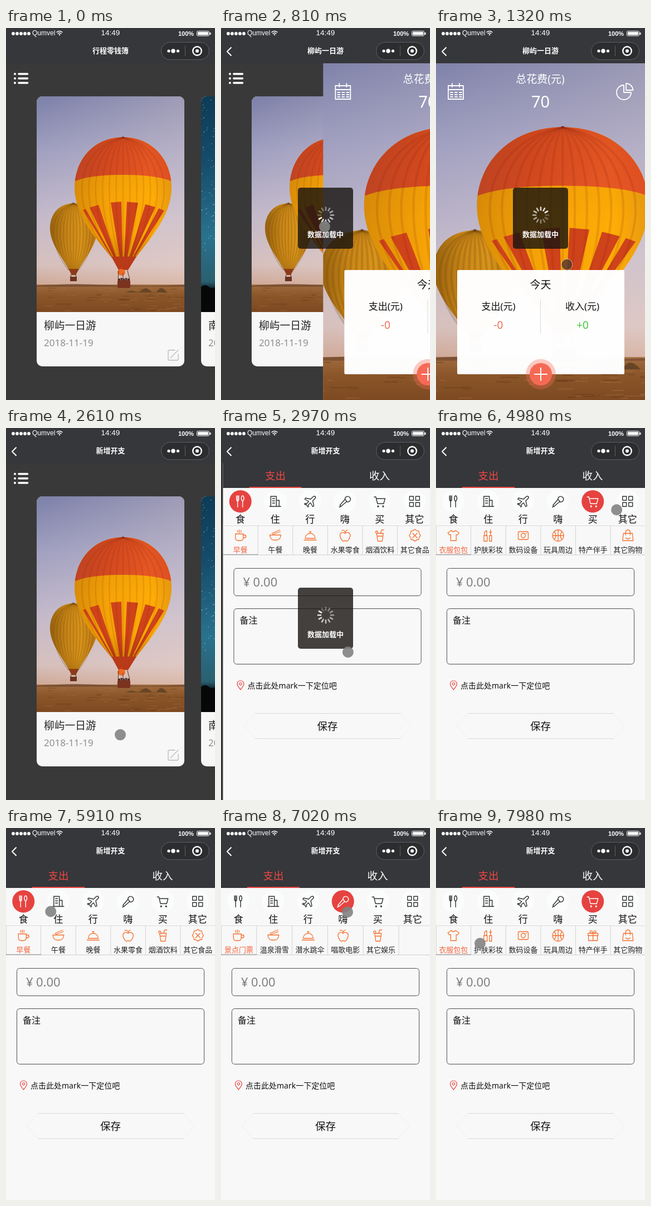
Animation of 375x664 px, one loop 8000 ms. Source, as an HTML page:

```html
<!DOCTYPE html>
<html lang="zh-CN">
<head>
<meta charset="utf-8">
<title>行程零钱簿</title>
<style>
html, body { margin: 0; width: 100%; height: 100%; overflow: hidden; background: #393939; }
svg { display: block; }
#stage { width: 375px; height: 664px; }
text { font-family: "Noto Sans", "Noto Sans CJK SC", "Noto Sans CJK", sans-serif; }
.arial { font-family: "Liberation Sans", Arial, sans-serif; }
.bold { font-weight: 700; }
.line { fill: none; stroke-linecap: round; stroke-linejoin: round; }
</style>
</head>
<body>
<svg id="stage" viewBox="0 0 375 664"></svg>
<script>
const LOOP = 8000;
const BAR = '#35373a', RED = '#e64340', ORANGE = '#f5702f';

const rect = (x, y, w, h, fill, more = '') => `<rect x="${x}" y="${y}" width="${w}" height="${h}" fill="${fill}" ${more}/>`;
const circle = (x, y, r, fill, more = '') => `<circle cx="${x}" cy="${y}" r="${r}" fill="${fill}" ${more}/>`;
const line = (d, color, width = 1, more = '') => `<path class="line" d="${d}" stroke="${color}" stroke-width="${width}" ${more}/>`;
const group = (id, body, more = '') => `<g id="${id}" ${more}>${body}</g>`;
// y is the middle of the glyphs
const text = (x, y, size, str, fill, anchor = 'middle', more = '') =>
  `<text x="${x}" y="${y + size * .37}" font-size="${size}" fill="${fill}" text-anchor="${anchor}" ${more}>${str}</text>`;
const gradient = (id, stops, more = 'x2="0" y2="1"') => `<linearGradient id="${id}" ${more}>${
  stops.map(([at, color]) => `<stop offset="${at}" stop-color="${color}"/>`).join('')}</linearGradient>`;
const range = n => [...Array(n).keys()];

let seed = 7;
const random = () => (seed = seed * 16807 % 2147483647) / 2147483647;

/* ---------- balloon photo ---------- */
const gores = (cx, top, low, half, color, opacity) => range(13).map(i => {
  const k = (i - 6) / 6.5, h = low - top;
  return line(`M${cx} ${top}C${cx + half * k} ${top + h * .08} ${cx + half * 1.33 * k} ${top + h * .54} ${cx + half * .25 * k} ${low}`,
    color, 2.4, `opacity="${opacity}"`);
}).join('');

const stripes = [[83, 88], [95, 111], [133, 152], [162, 182], [195, 213], [219, 229]].map(([a, b]) => {
  const top = x => 188 + ((x - 155) / 87) ** 2 * 22, low = x => 155 + (x - 155) * .28;
  return `M${a} ${top(a)}L${b} ${top(b)}L${low(b)} 287L${low(a)} 287z`;
}).join('');

const grass = range(70).map(() => {
  const x = random() * 265, y = 342 + random() * 42;
  return line(`M${x} ${y}h${4 + random() * 16}`, random() < .5 ? '#5f3515' : '#a9723c', 1.2, 'opacity=".4"');
}).join('');

const envelope = 'M155 73C100 73 68 116 68 163C68 214 110 258 135 288L178 288C200 258 242 214 242 163C242 116 210 73 155 73z';
const smallEnvelope = 'M66 191C39 191 24 211 24 236C24 264 48 290 58 309L75 309C86 290 109 264 109 236C109 211 93 191 66 191z';

const photo = `<symbol id="photo" viewBox="0 0 265 385" preserveAspectRatio="none">
  ${rect(0, 0, 265, 385, 'url(#sky)')}${rect(0, 0, 265, 337, 'url(#glow)')}
  ${rect(0, 336, 265, 49, 'url(#field)')}${grass}
  <path d="M0 338Q60 333 130 337T265 336V340H0z" fill="#7d5234"/>
  <path d="M160 350q8-5 16-2t14-3 14 2 14-1 16 4z" fill="#553a20" opacity=".7"/>
  <path d="${smallEnvelope}" fill="url(#gold)"/>
  ${gores(66, 191, 309, 42, '#6b3f06', .22)}
  <path d="M57 308h19l-6 11h-7z" fill="#8c3b19"/>
  ${line('M62 318l-1 4M70 318l1 4', '#4a2a18')}${rect(60, 322, 12, 8, '#6b3322')}
  <path d="${envelope}" fill="url(#yellow)"/>
  <clipPath id="hull"><path d="${envelope}"/></clipPath>
  <path d="M60 60H250V156Q225 140 155 140T60 156z" fill="url(#crown)" clip-path="url(#hull)"/>
  <path d="${stripes}" fill="#cf431a" clip-path="url(#hull)"/>
  ${gores(155, 73, 288, 87, '#7a1c08', .13)}
  <path d="${envelope}" fill="url(#shade)"/>
  <path d="M134 286h45l-15 24h-17z" fill="#b83a18"/>
  <ellipse cx="152" cy="314" rx="7" ry="6" fill="#ef6a25"/>
  ${line('M147 312l-1 15M163 311l4 16M155 316v10', '#5a3222')}
  ${rect(145, 328, 23, 14, '#7a3420', 'rx="2"')}
  ${range(5).map(i => circle(148 + i * 4.2, 327 - i % 2, 2, '#432a22')).join('')}
</symbol>`;

const defs = `<defs>
  ${gradient('sky', [[0, '#7c80a8'], [.25, '#a09fc0'], [.55, '#c3b9ca'], [.78, '#d6c0bd'], [.88, '#cfa794']])}
  ${gradient('glow', [[0, '#f4e4e000'], [1, '#f4e0d848']], '')}
  ${gradient('field', [[0, '#a06c3f'], [.4, '#8b5629'], [1, '#7d4922']])}
  ${gradient('yellow', [[0, '#d98c08'], [.35, '#f5a307'], [.8, '#feac06'], [1, '#e89a10']], '')}
  ${gradient('crown', [[0, '#bf4424'], [.35, '#d84b20'], [.75, '#ec5a25'], [1, '#e24e22']], '')}
  ${gradient('gold', [[0, '#95600f'], [.35, '#c98617'], [.65, '#d9941b'], [1, '#b57314']], '')}
  ${gradient('shade', [[0, '#5a1a0018'], [.5, '#5a1a0000'], [.8, '#5a1a0000'], [1, '#5a1a0030']])}
  ${gradient('night', [[0, '#0e3b55'], [.3, '#154c6b'], [.65, '#29728e'], [.86, '#2a5f70'], [.9, '#0a1519']])}
  <clipPath id="cardClip">${rect(55, 122, 265, 482, '#fff', 'rx="10"')}</clipPath>
  ${photo}
</defs>`;

/* ---------- pages ---------- */
const trip = '柳屿一日游';
const nightSky = rect(55, 122, 265, 385, 'url(#night)') +
  range(70).map(() => circle(56 + random() * 26, 124 + random() * 290, .3 + random() * .6, '#b8dbe5', 'opacity=".7"')).join('') +
  '<path d="M55 462q8-6 14 0t14-2V507H55z" fill="#050708"/>';

const card = (dx, image, name, date) => `<g transform="translate(${dx})"><g clip-path="url(#cardClip)">
  ${rect(55, 122, 265, 482, '#f7f7f7')}${image}
  ${text(68, 531, 18.75, name, '#222', 'start')}${text(68, 562, 17, date, '#8f8f8f', 'start')}
  ${line('M303 575H293q-2 0-2 2V591q0 2 2 2H307q2 0 2-2V582M295 589L309 575', '#bbb', 1.3)}</g></g>`;

const home = rect(0, 63, 375, 601, '#393939') +
  [82, 90, 98].map(y => circle(16, y, 2, '#fff') + line(`M23 ${y}H38.500`, '#fff', 3.6)).join('') +
  card(0, '<use href="#photo" x="55" y="122" width="265" height="385"/>', trip, '2018-11-19') +
  card(295, nightSky, '南', '2018');

const calendar = line('M22 103H49V127H22zM22 110H49M29 99v6M42 99v6', '#fff', 1.8) +
  line('M26 115H46M26 119H46M26 123H46', '#fff', 1.8, 'stroke-dasharray="4 4"');

const detail = `<svg x="0" y="63" width="375" height="601"><use href="#photo" x="-47" y="0" width="469" height="601"/></svg>` +
  calendar + line('M337 102A13 13 0 1 0 350 115H337zM341 99V111H353.500A12.500 12.500 0 0 0 341 99z', '#fff', 1.8) +
  text(187, 91, 19, '总花费(元)', '#fff') + text(187.5, 131, 29, '70', '#fff') +
  rect(38, 432, 300, 186, '#fff', 'rx="2" opacity=".985"') +
  text(187.5, 458, 19, '今天', '#111') + line('M187.500 485V545', '#d8d8d8') +
  text(112, 497, 17, '支出(元)', '#111') + text(262.5, 497, 17, '收入(元)', '#111') +
  text(112, 530, 19, '-0', '#f0705a') + text(263, 530, 19, '+0', '#49c93c') +
  circle(188, 618, 27, '#f66a55', 'opacity=".35"') + circle(188, 618, 20, '#f66a55') +
  line('M188 607v22M177 618h22', '#fff', 2);

const icons = {
  cutlery: 'M5 2v6q0 3 2 3.500V22M9 2v6q0 3-2 3.500M7 2v8M16 12C12 8 14 2 16 2s4 6 0 10V22',
  building: 'M4 21V3h10v18M14 10h5v11M2 21h20M7 7h4M7 11h4M7 15h4',
  plane: 'M21 3q-2-1-4 1l-4 4L4 6 2.500 8l7 4-3.500 4-3-.5L2 17l4 1.500L8 22l1.300-1-.5-3 4-3.500 4 7 2-1.500-2-9 4-4q2-2 .2-4z',
  mic: 'M12 8.500L3 19l2 2 10.500-9M16 13a5 5 0 1 0-4-5zM5 21l-3 1',
  cart: 'M2 4h3l3 12h11l2.500-9H6M9 20a1 1 0 1 0 .1 0M18 20a1 1 0 1 0 .1 0',
  grid: 'M3 3h7v7H3zM14 3h7v7h-7zM3 14h7v7H3zM14 14h7v7h-7z',
  cup: 'M3 9h14v7q0 5-5 5H8q-5 0-5-5zM17 11h2q3 0 3 2.500t-3 2.500h-2M7 6V3M10 7V2M13 6V3',
  bowl: 'M2 11h20q-1 9-8 9h-4q-7 0-8-9zM6 8L20 2M7 10L21 5',
  cloche: 'M3 17a9 9 0 0 1 18 0zM1 20h22M12 8V5M10.500 5h3',
  apple: 'M12 8C7 4 2 8 3 13s4 9 6 9 2-1 3-1 1 1 3 1 5-4 6-9-4-9-9-5zM12 8q0-4 4-6M12 5Q9 1 6 3',
  drink: 'M6 8h12l-2 14H8zM13 8l2-6h4M7 13h10M6 4a2 2 0 1 0 .1 0',
  plate: 'M12 1q3 3 7 3 0 4 3 8-3 3-3 7-4 0-7 3-3-3-7-3 0-4-3-7 3-4 3-8 4 0 7-3zM8 8l8 8M16 8l-8 8',
  shirt: 'M8 3L2 7l2.500 4L7 10v11h10V10l2.500 1L22 7l-6-4q-4 4-8 0z',
  lipstick: 'M4 12h6v10H4zM5 12V6l4-3v9M16 2v10M14 12h4v10h-4zM14 6h4',
  camera: 'M5 5h14q2 0 2 2v10q0 2-2 2H5q-2 0-2-2V7q0-2 2-2zM12 8a4 4 0 1 0 .1 0M17 8h1',
  ball: 'M12 2a10 10 0 1 0 .1 0M2 12h20M12 2v20M5 5q6 7 0 14M19 5q-6 7 0 14',
  gift: 'M3 8h18v4H3zM4 12h16v9H4zM12 8v13M12 8Q5 7 7 4t5 4Q15 1 17 4t-5 4',
  bag: 'M4 8h16l1.500 13H2.500zM8 11V6q0-4 4-4t4 4v5M8 16q4 4 8 0'
};
const icon = (name, x, y, color, width = 1.3, more = '') =>
  line(icons[name], color, width, `transform="translate(${x - 12} ${y - 12})" ${more}`);

const categories = [
  ['食', 'cutlery', '早餐 午餐 晚餐 水果零食 烟酒饮料 其它食品', 'cup bowl cloche apple drink plate'],
  ['住', 'building', '酒店 民宿 青旅 露营 租房 其它住宿', 'building cloche cup shirt gift plate'],
  ['行', 'plane', '飞机 火车 汽车 轮船 租车 其它交通', 'plane building cart cloche ball plate'],
  ['嗨', 'mic', '景点门票 温泉滑雪 潜水跳伞 唱歌电影 其它娱乐', 'camera bowl ball mic plate'],
  ['买', 'cart', '衣服包包 护肤彩妆 数码设备 玩具周边 特产伴手 其它购物', 'shirt lipstick camera ball gift bag'],
  ['其它', 'grid', '人情红包 通讯话费 医疗药品 其它花费', 'gift camera apple grid']
].map(([name, glyph, labels, glyphs]) => ({ name, glyph, labels: labels.split(' '), glyphs: glyphs.split(' ') }));
const cellWidth = labels => labels.length === 5 ? 63.8 : 62.6;

const categoryCell = ({ name, glyph }, i) => {
  const x = 31.25 + 62.5 * i;
  return circle(x, 131, 20, '#fbfcfc') + circle(x, 131, 20, RED, `id="spot${i}"`) +
    icon(glyph, x, 131, '#333', 1.4, `id="glyph${i}"`) + text(x, 163, 17, name, '#111');
};
const subRow = ({ labels, glyphs }, c) => {
  const w = cellWidth(labels), middle = i => (i + .5) * w;
  return group('labels' + c, labels.map((name, i) =>
      text(middle(i), 217, 13, name, i ? '#222' : '#f5623c') +
      line(`M${(i + 1) * w} 175V226`, '#d2d2d2')).join('') +
      line('M.5 175V226', '#d2d2d2') + line(`M0 226H${w}`, '#8a8a8a')) +
    group('icons' + c, glyphs.map((g, i) => icon(g, middle(i), 192, ORANGE, 1.3, g === 'gift' && c === 4 ? 'id="gift"' : '')).join(''));
};

const box = (y, h) => rect(19.5, y + .5, 336, h - 1, 'none', 'rx="5" stroke="#505050"');
const expense = rect(0, 63, 375, 601, '#f8f8f8') + rect(0, 63, 375, 44, BAR) +
  text(94, 85, 18.5, '支出', '#ef4744') + text(281, 85, 18.5, '收入', '#fff') + rect(47, 105, 94, 2, RED) +
  categories.map(categoryCell).join('') +
  line('M0 174.500H375', '#dcdcdc') + line('M0 226.500H375', '#cfcfcf') +
  categories.map(subRow).join('') +
  box(250, 50) + text(36, 275, 22, '¥', '#808080', 'start') + text(54, 275, 22, '0.00', '#808080', 'start') +
  box(322, 100) + text(30, 343, 16, '备注', '#111', 'start') +
  line('M31.500 467q-6-7-6-10.500a6 5.500 0 0 1 12 0q0 3.500-6 10.500zM31.500 454.500a2.200 2.200 0 1 0 .1 0', RED, 1.2) +
  text(44, 460, 14, '点击此处mark一下定位吧', '#111', 'start') +
  line('M58 509.500H318L338 532 318 554.500H58L38 532z', '#efefef') +
  line('M58 509.500H318M58 554.500H318', '#dadada') + text(187.5, 532, 18.5, '保存', '#111');

const header = rect(0, 0, 375, 63, BAR) +
  range(5).map(i => circle(13 + i * 7, 10, 2.9, '#fff')).join('') +
  text(47, 9, 12, 'Qumvel', '#fff', 'start', 'class="arial"') +
  line('M91 7.500q5-4 10 0M93 10q3-2.500 6 0', '#fff', 1.4) + circle(96, 12, 1.2, '#fff') +
  text(187.5, 8.5, 13.5, '14:49', '#fff', 'middle', 'class="arial"') +
  text(309, 9.5, 11, '100%', '#fff', 'start', 'class="arial bold"') +
  rect(342.5, 5.5, 22, 8.5, 'none', 'rx="2" stroke="#fff"') + rect(344, 7, 19, 5.5, '#fff', 'rx="1"') + rect(365.5, 8, 2, 4, '#fff') +
  text(187.5, 40.5, 13, '', '#fff', 'middle', 'id="title" class="bold"') +
  group('back', line('M18 35l-7 7 7 7', '#fff', 2)) +
  rect(278.5, 25.5, 86, 31, '#2c2d2f', 'rx="15.500" stroke="#5d5f62"') +
  circle(292, 41, 2.6, '#fff') + circle(300, 41, 3.7, '#fff') + circle(308.5, 41, 2.6, '#fff') +
  line('M321.500 32V50', '#5d5f62') + circle(343, 41, 7.8, 'none', 'stroke="#fff" stroke-width="2.400"') + circle(343, 41, 3, '#fff');

const toast = rect(138, 285, 99, 109, '#17130f', 'rx="5" opacity=".8"') +
  group('spinner', range(12).map(i =>
    line('M0 -9V-14', '#fff', 2.6, `transform="rotate(${i * 30})" opacity="${.25 + i * .06}"`)).join('')) +
  text(187.5, 368, 13, '数据加载中', '#fff', 'middle', 'class="bold"');

document.getElementById('stage').innerHTML = defs + group('home', home) + group('detail', detail) +
  group('expense', expense) + header + group('toast', toast) + circle(0, 0, 10, '#858585', 'id="cursor"');

/* ---------- motion ---------- */
const $ = id => document.getElementById(id);
const show = (id, on) => $(id).setAttribute('display', on ? 'inline' : 'none');
const within = (t, a, b) => t >= a && t < b;
const clamp = v => Math.min(1, Math.max(0, v));
const slideX = (t, a, b) => 375 * (1 - clamp((t - a) / (b - a))) ** 3;
const latest = (steps, t) => steps.filter(([at]) => at <= t).pop()[1];

const titles = [[0, '行程零钱簿'], [690, trip], [2580, '新增开支']];
const picks = [[0, 0], [3930, 1], [4290, 2], [4620, 3], [4860, 4], [5160, 5], [5760, 0], [7020, 3], [7530, 4]];
const trail = [
  [60, 339, 112], [240, 152, 308], [480, 152, 308], [1290, 235, 422], [1320, 235, 422], [2070, 189, 620],
  [2550, 189, 620], [2610, 205, 548], [3210, 243, 302], [3360, 243, 302], [3420, 235, 270], [3480, 209, 237],
  [3540, 165, 187], [3630, 127, 150], [3750, 99, 143], [3900, 99, 143], [4080, 150, 145], [4260, 150, 145],
  [4380, 165, 145], [4560, 165, 145], [4680, 218, 142], [4830, 275, 145], [4980, 324, 146], [5100, 341, 146],
  [5370, 341, 146], [5700, 45, 146], [5820, 45, 146], [6060, 138, 154], [6360, 138, 154], [6480, 172, 158],
  [6630, 171, 153], [6870, 217, 149], [7000, 217, 149], [7020, 227, 150], [7320, 227, 150], [7470, 280, 145],
  [7620, 280, 145], [7980, 79, 206]
];

function cursorAt(t) {
  const next = trail.findIndex(([at]) => at > t);
  if (next < 1) return trail[next < 0 ? trail.length - 1 : 0].slice(1);
  const [t0, x0, y0] = trail[next - 1], [t1, x1, y1] = trail[next], p = (t - t0) / (t1 - t0);
  return [x0 + (x1 - x0) * p, y0 + (y1 - y0) * p];
}

function render(t) {
  $('title').textContent = latest(titles, t);
  show('back', t >= 690);
  show('detail', within(t, 690, 2580));
  $('detail').setAttribute('transform', `translate(${slideX(t, 690, 1260)})`);
  show('expense', t >= 2640);
  $('expense').setAttribute('transform', `translate(${slideX(t, 2640, 3060)})`);

  show('toast', within(t, 720, 1800) || within(t, 2700, 3180));
  $('spinner').setAttribute('transform', `translate(188 334) rotate(${Math.floor(t / 83.3) * 30})`);

  // icons load a moment after their labels
  const picked = latest(picks, t), loaded = latest(picks, Math.max(0, t - 90));
  categories.forEach((_, i) => {
    show('spot' + i, i === picked);
    $('glyph' + i).setAttribute('stroke', i === picked ? '#fff' : '#333');
    show('labels' + i, i === picked);
    show('icons' + i, i === loaded);
  });
  [...$('icons' + loaded).children].forEach((el, i) =>
    el.setAttribute('visibility', i < categories[picked].labels.length ? 'visible' : 'hidden'));
  show('gift', t > 5040);

  const [x, y] = cursorAt(t), onPhoto = within(t, 1260, 2100), cursor = $('cursor');
  show('cursor', t >= 60);
  cursor.setAttribute('transform', `translate(${x} ${y})`);
  cursor.setAttribute('r', within(t, 2100, 2130) ? 14 : 10);
  cursor.setAttribute('fill', onPhoto ? '#5a3a2a' : '#828282');
  cursor.setAttribute('opacity', onPhoto ? .85 : .9);
  cursor.setAttribute('stroke', onPhoto ? '#d9c4a8' : 'none');
}

const start = performance.now();
function tick() {
  render((performance.now() - start) % LOOP);
  requestAnimationFrame(tick);
}
tick();
</script>
</body>
</html>
```
